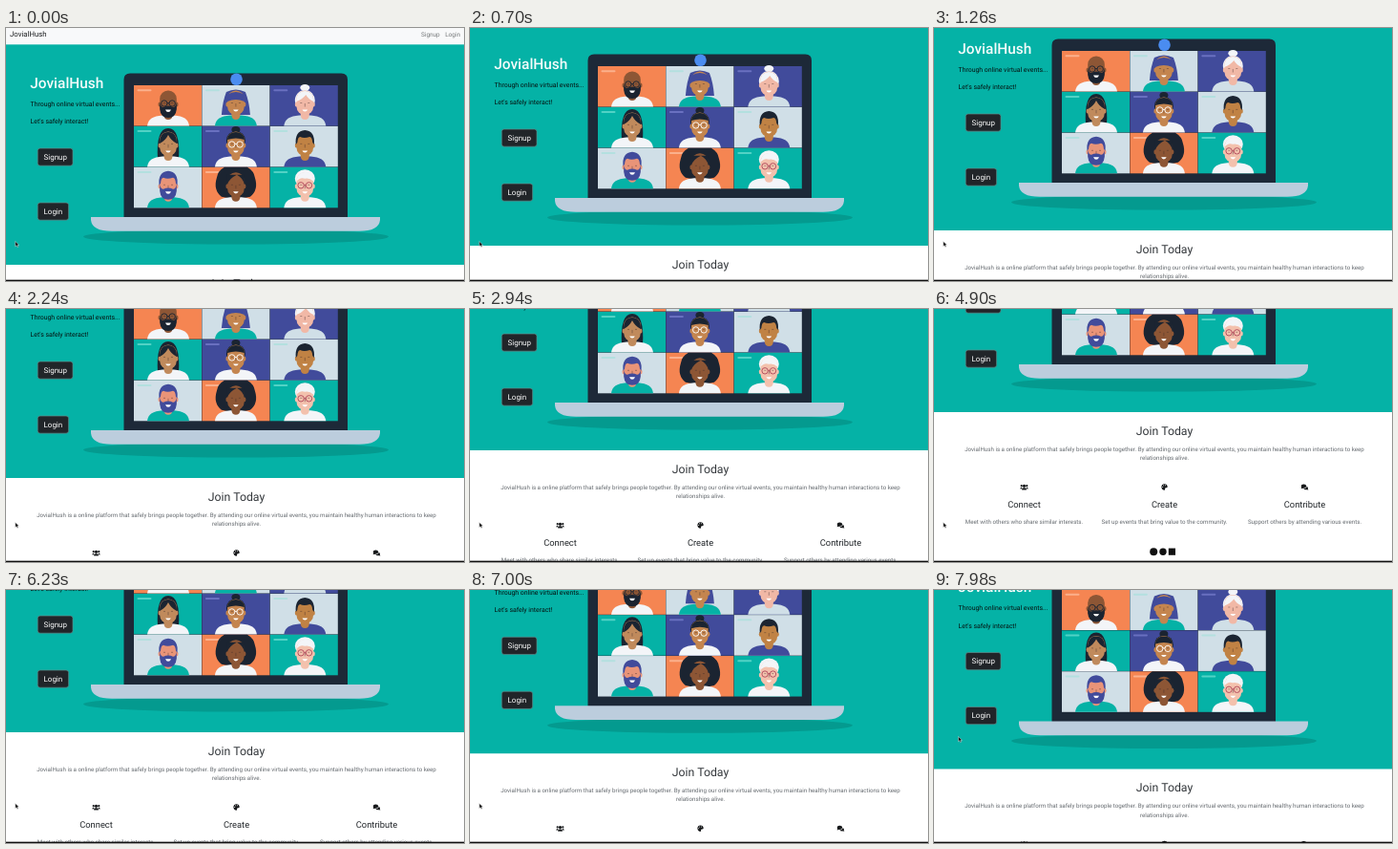
An HTML page for the animation above (8000 ms loop, 480 by 265 pixels).

```html
<!DOCTYPE html>
<html lang="en">
<head>
<meta charset="utf-8">
<title>JovialHush</title>
<style>
  html, body { margin: 0; width: 100%; height: 100%; overflow: hidden; background: #fff; }
  svg { display: block; width: 100vw; height: 100vh; }
  text { font-family: Roboto, Arial, sans-serif; text-rendering: geometricPrecision; }
  .mid { text-anchor: middle; }
  .copy { font-size: 6.2px; fill: #666b70; }
  .lead { font-size: 6.9px; fill: #06110f; }
  .btn rect { fill: #212529; stroke: #5f8d8b; stroke-width: .7; }
  .btn text { font-size: 7.95px; fill: #fff; }
  .h4 { font-size: 9.35px; fill: #212529; }
</style>
</head>
<body>
<svg viewBox="0 0 480 265" preserveAspectRatio="none">
  <rect width="480" height="265" fill="#fff"/>
  <g id="page">
    <rect width="480" height="17.3" fill="#f8f9fa"/>
    <text x="4" y="9.2" font-size="7.75" fill="#1b1d1f">JovialHush</text>
    <g font-size="6.45" fill="#777a7c">
      <text x="435" y="8.7">Signup</text>
      <text x="460.2" y="8.7">Login</text>
    </g>

    <rect y="17.3" width="480" height="230.7" fill="#05b2a6"/>
    <text x="25.3" y="62.7" font-size="15.4" font-weight="500" fill="#f4fbfa">JovialHush</text>
    <text class="lead" x="25.6" y="81.8">Through online virtual events...</text>
    <text class="lead" x="25.6" y="100">Let's safely interact!</text>
    <g class="btn">
      <rect x="33.2" y="126" width="36.8" height="18.2" rx="2.6"/>
      <text x="39.6" y="137.8">Signup</text>
      <rect x="33.2" y="183" width="32.4" height="18.2" rx="2.6"/>
      <text x="39.6" y="194.8">Login</text>
    </g>

    <ellipse cx="241" cy="218.6" rx="160" ry="8" fill="#049a8f"/>
    <path d="M123.5 199V54q0-6.5 6.5-6.5H351.500q6.500 0 6.500 6.500V199z" fill="#1d2938"/>
    <g id="calls"></g>
    <circle cx="241.5" cy="53.800" r="6.300" fill="#4a8cf0"/>
    <path d="M89 198H392V201Q391 212.800 370 212.800H111Q90 212.800 89 201z" fill="#bccddd"/>

    <text class="mid" x="241.500" y="271.500" font-size="12.300" fill="#33373b">Join Today</text>
    <g class="copy mid">
      <text x="241.500" y="288.700">JovialHush is a online platform that safely brings people together. By attending our online virtual events, you maintain healthy human interactions to keep</text>
      <text x="241.500" y="298">relationships alive.</text>
    </g>
    <g id="features"></g>

    <g fill="#111">
      <circle cx="230.200" cy="394.200" r="4"/>
      <circle cx="240" cy="394.200" r="3.700"/>
      <rect x="245.800" y="390.600" width="7.200" height="7.200"/>
    </g>
  </g>
  <rect y="263.700" width="480" height="1.300" fill="#111"/>
  <path id="cursor" d="M0 0V5.300L1.300 4.200L2.200 6.100L3.200 5.600L2.300 3.800H4z" fill="#111" stroke="#fff" stroke-width=".4"/>
</svg>
<script>
const $ = id => document.getElementById(id);
const NAVY = '#414b9b', INK = '#1b2431', TEAL = '#05b2a6', ORANGE = '#f58552',
      PALE = '#d0dfe7', WHITE = '#f3f5f8';

const path = (d, fill) => `<path d="${d}" fill="${fill}"/>`;
const oval = (x, y, rx, ry, fill) => `<ellipse cx="${x}" cy="${y}" rx="${rx}" ry="${ry}" fill="${fill}"/>`;
const glasses = color => `<g fill="none" stroke="${color}" stroke-width=".9">
  <circle cx="-4.200" cy="19" r="3.200"/><circle cx="4.200" cy="19" r="3.200"/><path d="M-1 18.500H1"/></g>`;
const beard = color =>
  path('M-8.800 18Q-8 23-5 23Q0 20.500 5 23Q8 23 8.800 18V25Q8 34 0 34Q-8 34-8.800 25z', color) +
  path('M-3 25.500H3Q2 28 0 28Q-2 28-3 25.500', '#fff');
const cap = color => path('M-9.500 19Q-11 5 0 4Q11 5 9.500 19L8 17Q7.500 11 5 11Q-1 13-5 11Q-7.500 11-8 17z', color);

// Each caller: backdrop, skin, shirt, hair behind the head, details in front
const callers = [
  [ORANGE, '#8d5635', WHITE, '', beard(INK) + glasses(INK)],
  [PALE, '#c4854f', TEAL,
    path('M-10 7Q0 2 10 7Q14 17 15 31H-15Q-14 17-10 7', NAVY),
    path('M-9 17V10Q0 4 9 10V17Q0 13-9 17', NAVY)],
  [NAVY, '#f1b8a6', PALE, oval(0, 2.500, 5, 3.500, WHITE) + oval(0, 16, 10.500, 11, WHITE),
    path('M-9 17Q-9 6 0 6Q9 6 9 17Q4 15 1 10Q-3 15-9 17', WHITE)],
  [TEAL, '#c08a5c', WHITE, path('M-11 35Q-13 2 0 2Q13 2 11 35z', INK),
    path('M-9 18Q-9 6 0 6Q9 6 9 18Q3 15 0 9Q-3 15-9 18', INK)],
  [NAVY, '#c4854f', WHITE, oval(0, 3.500, 4.500, 3.500, INK) + oval(0, 15, 10, 10, INK),
    path('M-9 14Q-8 6 0 6Q8 6 9 14Q0 11-9 14', INK) + glasses('#fff')],
  [PALE, '#c08244', NAVY, '', cap(INK)],
  [PALE, '#e99478', TEAL, '', cap(NAVY) + beard(NAVY)],
  [ORANGE, '#8d5635', WHITE, path('M-15 31Q-24 24-20 11Q-19 4-12 0H12Q19 4 20 11Q24 24 15 31Q0 35-15 31', INK),
    path('M-9 18Q-7 12 1 8Q7 11 9 18V8H-9z', INK)],
  [TEAL, '#f3c1ad', WHITE, oval(0, 12, 10.500, 9.500, WHITE),
    path('M-9 15Q-8 5 1 5Q9 6 9 15Q5 11 0 12Q-5 10-9 15', WHITE) + glasses('#b0475a')],
];

const centers = [36, 35.500, 36.500];
$('calls').innerHTML = callers.map(([back, skin, shirt, behind, front], i) => {
  const col = i % 3, row = (i - col) / 3;
  const label = back === PALE ? '#b3e0df' : back === ORANGE ? '#fbb08c' : back === NAVY ? '#6970c0' : '#52d2c5';
  return `<g transform="translate(${134 + col * 71.400} ${60 + row * 42.900})">
    <rect width="71" height="42.500" fill="${back}"/>
    <rect x="3.500" y="4.200" width="15" height="2" rx="1" fill="${label}"/>
    <g transform="translate(${centers[col]} 0)">${behind}
      ${path('M-22 42.500C-21 35-16 32.500-6 31.500H6C16 32.500 21 35 22 42.500z', shirt)}
      ${path('M-4.500 25H4.500V31.500Q4 36 0 36Q-4 36-4.500 31.500z', skin)}
      ${oval(-9, 20, 1.500, 2.500, skin)}${oval(9, 20, 1.500, 2.500, skin)}
      <rect x="-8.800" y="5.500" width="17.600" height="25.500" rx="8.600" fill="${skin}"/>
      <path d="M-2.800 25.500H2.800Q2 27.600 0 27.600Q-2 27.600-2.800 25.500" fill="#fff"/>
      <path d="M-5 18.500H-3M3 18.500H5M0 19V22.500" stroke="#3a2a2a" stroke-opacity=".5" stroke-width=".8"/>
      ${front}
    </g></g>`;
}).join('');

const icons = [
  `<circle cy="-1.200" r="1.600"/><circle cx="-2.800" cy="-1.300" r="1.100"/><circle cx="2.800" cy="-1.300" r="1.100"/>
   <path d="M-2.400 3V2Q-2 .7 0 .7Q2 .7 2.400 2V3zM-4 2V1Q-3.500 0-2 .3L-3 2zM4 2V1Q3.500 0 2 .3L3 2z"/>`,
  `<path d="M0-3.200A3.200 3.200 0 1 0 .2 3.200Q1 2.500.5 1.400Q.8.700 2 .8Q3.200.8 3.200-.2A3.200 3.200 0 0 0 0-3.200"/>
   <g fill="#fff"><circle cx="-1.800" cy="0" r=".5"/><circle cx="-.9" cy="-1.700" r=".5"/><circle cx="1" cy="-1.700" r=".5"/></g>`,
  `<ellipse cx="-1" cy="-.9" rx="2.700" ry="2.100"/><path d="M-3.200 0L-3.800 1.700L-1 .9z"/>
   <path d="M2.200-.8Q4.200.2 3.300 1.800L3.900 3.100L2 2.700Q-.4 3-1.200 1.700Q2 1.600 2.200-.8"/>`,
];
$('features').innerHTML = [
  ['Connect', 'Meet with others who share similar interests.'],
  ['Create', 'Set up events that bring value to the community.'],
  ['Contribute', 'Support others by attending various events.'],
].map(([title, copy], i) => `<g class="mid" transform="translate(${94.500 + i * 147} 0)">
  <g transform="translate(0 326.500)" fill="#16181a">${icons[i]}</g>
  <text class="h4" y="347.800">${title}</text>
  <text class="copy" y="364.500">${copy}</text></g>`).join('');

const LOOP = 8000, STEP = 70;
const scroll = [[0, 0], [1260, 36], [2240, 71], [2940, 100], [3360, 116], [3990, 116], [4900, 140],
  [5180, 140.700], [5320, 140.700], [6230, 99], [6790, 80], [6860, 80], [7700, 60.500], [LOOP, 60.500]];
const pointerX = [[0, 9.700], [7560, 9.700], [7700, 11], [7980, 25.500], [LOOP, 25.500]];
const pointerY = [[0, 223.500], [7560, 223.500], [7700, 196], [7980, 153.500], [LOOP, 153.500]];

// Linear interpolation between [time, value] keys
function at(keys, t) {
  const i = Math.max(1, keys.findIndex(k => k[0] >= t));
  const [t0, a] = keys[i - 1], [t1, b] = keys[i];
  return a + (b - a) * (t - t0) / (t1 - t0);
}

function render(ms) {
  const t = Math.floor((ms % LOOP) / STEP) * STEP;
  $('page').setAttribute('transform', `translate(0 ${-at(scroll, t)})`);
  $('cursor').setAttribute('transform', `translate(${at(pointerX, t)} ${at(pointerY, t)})`);
}

const start = performance.now();
function tick() {
  render(performance.now() - start);
  requestAnimationFrame(tick);
}
tick();
</script>
</body>
</html>
```
